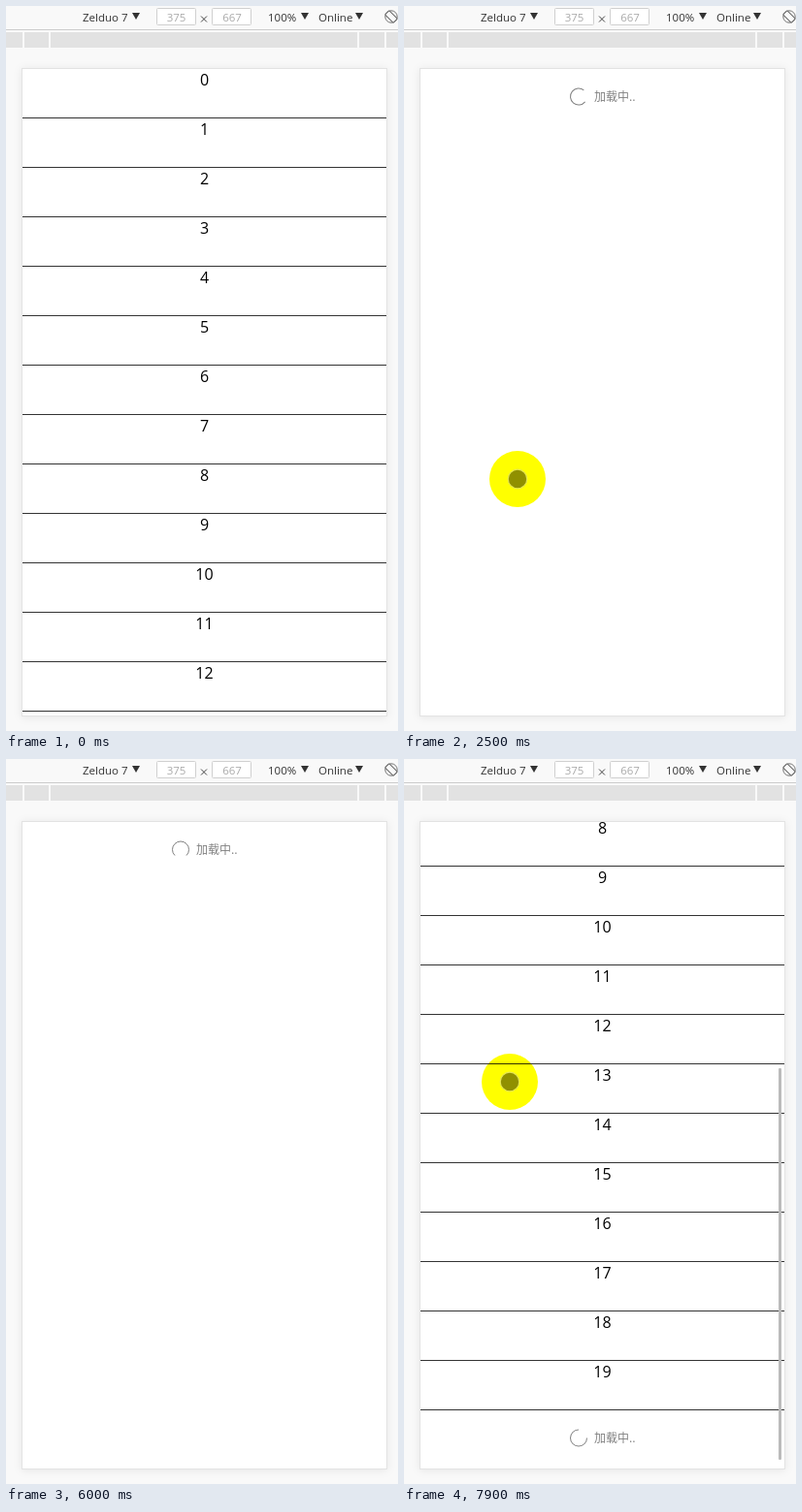
These frames come from a looping animation (404x748 px, 8 s). An HTML page:

```html
<!DOCTYPE html>
<html lang="zh">
<head>
<meta charset="utf-8">
<style>
  html, body { margin: 0; width: 100%; height: 100%; overflow: hidden; background: #f9f9f9; }
  svg { display: block; width: 100vw; height: 100vh; }
  text { white-space: pre; }
  .bar { font: 11.5px "Open Sans", "Noto Sans", sans-serif; fill: #333; }
  .dim { fill: #aaa; text-anchor: middle; }
  .row { font: 16px "Open Sans", "Noto Sans", sans-serif; fill: #000; text-anchor: middle; }
  .tip { font: 12px "Noto Sans CJK SC", "Noto Sans CJK", sans-serif; fill: #808080; }
  .device { filter: drop-shadow(0 1px 4px rgba(0, 0, 0, .08)); }
</style>
</head>
<body>
<svg viewBox="0 0 404 748">
  <defs>
    <clipPath id="view"><rect x="17" y="65" width="375" height="667"/></clipPath>
    <path id="arrow" d="M0 0h8l-4 7z" fill="#333"/>
  </defs>

  <rect width="404" height="748" fill="#f9f9f9"/>
  <rect y="24" width="404" height="1" fill="#ccc"/>
  <g fill="#e2e2e2">
    <rect y="27" width="17" height="16"/>
    <rect x="19" y="27" width="25" height="16"/>
    <rect x="46" y="27" width="316" height="16"/>
    <rect x="364" y="27" width="26" height="16"/>
    <rect x="392" y="27" width="12" height="16"/>
  </g>
  <g class="bar">
    <text x="79" y="16">Zelduo 7</text>
    <text x="270" y="16">100%</text>
    <text x="322" y="16">Online</text>
    <g fill="#fff" stroke="#d0d0d0">
      <rect x="155.5" y="2.5" width="40" height="17" rx="1"/>
      <rect x="212.5" y="2.5" width="40" height="17" rx="1"/>
    </g>
    <text class="dim" x="175.5" y="16">375</text>
    <text class="dim" x="233" y="16">667</text>
    <path d="M201 10.5l6 6m0-6l-6 6" stroke="#444"/>
  </g>
  <use href="#arrow" x="130" y="7"/>
  <use href="#arrow" x="304" y="7"/>
  <use href="#arrow" x="360" y="7"/>
  <g transform="translate(397 11)" fill="none" stroke="#666">
    <circle r="6.2" stroke-width=".9"/>
    <rect x="-3" y="-6" width="6" height="12" rx="1" transform="rotate(-45)" fill="#f9f9f9"/>
  </g>

  <rect class="device" x="16.5" y="64.5" width="376" height="668" fill="#fff" stroke="#e3e3e3"/>

  <g clip-path="url(#view)">
    <g id="list"></g>
    <g id="loader">
      <path id="spinner" d="M-6.01 6.01A8.5 8.5 0 1 1 6.01 6.01" fill="none" stroke="#808080"/>
      <text class="tip" x="196" y="33">加载中..</text>
    </g>
    <g id="empty">
      <g fill="none" stroke="#70bff2" stroke-width="1.2" stroke-linejoin="round">
        <path d="M201 80.5Q211 82 217 89Q221 95 217 101Q213 107 206 109.500Q199 107 190.500 95.500Q195 95 196 92Q192 91 191 88.500Q197 90 200 87Q202 84 201 80.500Z"/>
        <circle cx="206" cy="96" r="8" fill="#fff" stroke="#8fcaf0"/>
        <circle cx="206" cy="96" r="6" stroke="#c4e4f8" stroke-width=".8"/>
        <path d="M211 102.500l2-2l5.500 5.500l-2 2.500z" fill="#fff"/>
      </g>
      <text class="tip" x="158" y="132">没找到相关数据~</text>
    </g>
    <rect id="thumb" x="386" width="3" height="404" rx="1" fill="#bbb"/>
  </g>

  <g id="cursor">
    <circle r="29" fill="#ff0" style="mix-blend-mode:multiply"/>
    <circle r="9.8" fill="#909000" stroke="#e6e650" stroke-width="1.2"/>
  </g>
</svg>
<script>
const LOOP = 8000, STEP = 100, ROW = 51, TOP = 65, ROWS = 20, MAX = 413;
const $ = id => document.getElementById(id);
const list = $('list'), loader = $('loader'), spinner = $('spinner'),
      empty = $('empty'), thumb = $('thumb'), cursor = $('cursor');

// Touch strokes as [time, x, y]; the cursor is hidden outside them
const strokes = [
  [[2100, 14, 335], [2200, 55, 368], [2300, 108, 392], [2400, 119, 440], [2500, 117, 488],
   [2800, 110, 508], [3100, 116, 522], [3400, 116, 522], [3500, 125, 531], [3600, 88, 470], [3700, 41, 397]],
  [[7000, 50, 440], [7100, 43, 446], [7200, 52, 405], [7500, 98, 255], [7700, 110, 205],
   [7800, 110, 207], [7900, 109, 333]]
];

list.innerHTML = Array.from({ length: ROWS }, (_, i) =>
  `<text class="row" x="204.5" y="${i * ROW + 17}">${i}</text>
   <rect x="17" y="${i * ROW + 50}" width="375" height="1" fill="#333"/>`).join('');

const clamp = v => Math.max(0, Math.min(1, v));
const move = (el, x, y, turn = 0) => el.setAttribute('transform', `translate(${x} ${y}) rotate(${turn})`);
const show = (el, on) => el.setAttribute('visibility', on ? 'visible' : 'hidden');

function scrollAt(t) {
  const p = clamp((t - 7080) / 650);
  return Math.round(MAX * p * p * (3 - 2 * p));
}

function cursorAt(t) {
  const path = strokes.find(s => t >= s[0][0] && t <= s[s.length - 1][0]);
  if (!path) return null;
  const i = Math.max(1, path.findIndex(p => p[0] >= t));
  const [t0, x0, y0] = path[i - 1], [t1, x1, y1] = path[i];
  const p = (t - t0) / (t1 - t0);
  return [x0 + (x1 - x0) * p, y0 + (y1 - y0) * p];
}

function draw(t) {
  const listed = t < 1500 || t >= 6400;
  const noData = t >= 3000 && t < 4800;
  const scroll = scrollAt(t);
  const spinStart = t < 3000 ? 1460 : t < 6400 ? 4800 : 7525;

  show(list, listed);
  move(list, 0, TOP - scroll);
  show(empty, noData);
  show(loader, listed ? t >= spinStart && t > 7000 : !noData);
  move(loader, 0, listed ? TOP + ROWS * ROW - scroll : TOP);
  move(spinner, 180, 28.5, (t - spinStart) * 0.6);

  thumb.setAttribute('y', 74 + 245 * scroll / MAX);
  thumb.setAttribute('opacity', clamp((t - 7050) / 150));

  const pos = cursorAt(t);
  show(cursor, pos);
  if (pos) move(cursor, ...pos);
}

const start = performance.now();
function tick() {
  const t = (performance.now() - start) % LOOP;
  draw(Math.floor(t / STEP) * STEP);
  requestAnimationFrame(tick);
}
tick();
</script>
</body>
</html>
```
